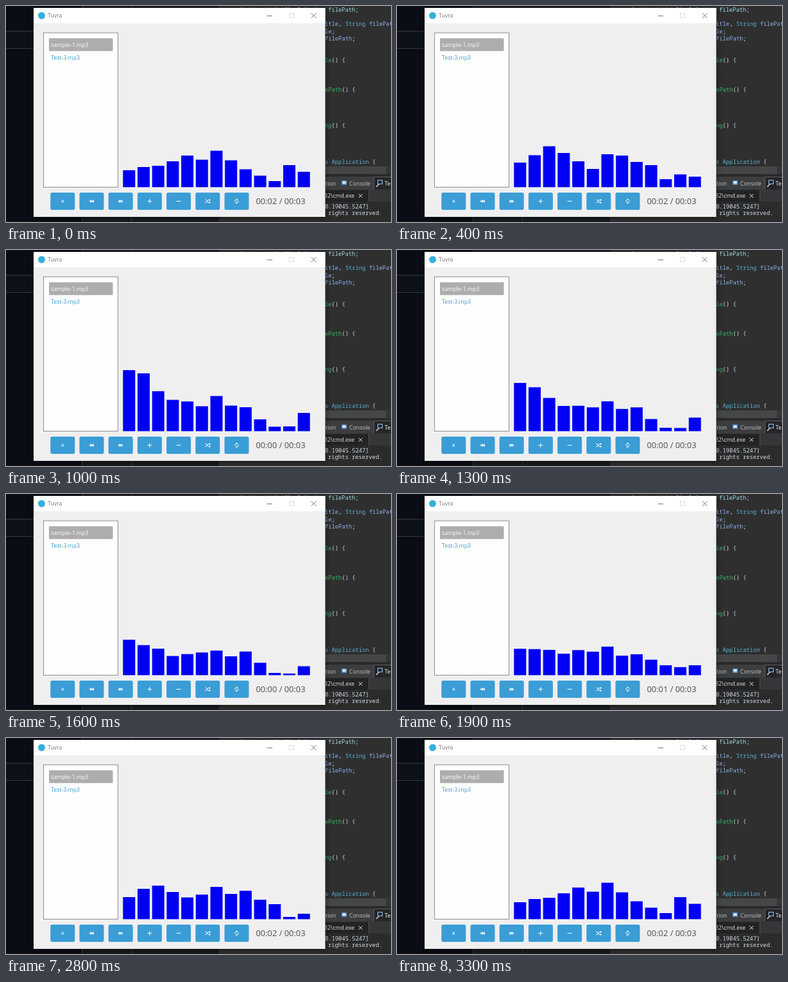
An HTML page for the animation above (3400 ms loop, 600x338 px).

```html
<!DOCTYPE html>
<html lang="en">
<head>
<meta charset="utf-8">
<title>Music player</title>
<style>
html, body { margin: 0; width: 100%; height: 100%; overflow: hidden; background: #0a0d15; }
svg { display: block; width: 600px; height: 338px; }
text { white-space: pre; font-family: "Open Sans", "Noto Sans", sans-serif; font-size: 8.75px; }
.code text { font-family: "Noto Sans Mono", "DejaVu Sans Mono", monospace; font-size: 8.8px; fill: #d0dbe4; }
.type { fill: #56b2d6; }
.field { fill: #a5dbe6; }
.param { fill: #8db4ec; }
.method { fill: #35b968; }
.tabs text { fill: #c3c5c7; }
.window { filter: drop-shadow(0 1px 4px rgba(0, 0, 0, .55)); }
.line { fill: none; stroke: #fff; stroke-width: 1; }
</style>
</head>
<body>
<svg viewBox="0 0 600 338">
  <rect width="600" height="338" fill="#0a0d15"/>
  <rect y="39" width="43" height="27" fill="#0d111a"/>
  <path d="M0 39.5H43M0 66.5H43" stroke="#343943"/>
  <rect x="118" width="217" height="338" fill="#191b1f"/>
  <path d="M118.5 0V338M195.5 0V338" stroke="#373a3e"/>
  <rect y="337" width="118" height="1" fill="#241a13"/>
  <rect x="332" width="268" height="338" fill="#2f2f2f"/>

  <g class="code">
    <text x="354" y="9">private static final <tspan class="type">String</tspan></text>
    <text x="502" y="9"><tspan class="field">filePath</tspan>;</text>
    <text x="497" y="31"><tspan class="param">itle</tspan>, <tspan class="type">String</tspan> <tspan class="param">filePath</tspan>) {</text>
    <text x="497" y="43"><tspan class="param">le</tspan>;</text>
    <text x="497" y="54"><tspan class="param">filePath</tspan>;</text>
    <text x="497" y="88"><tspan class="method">le</tspan>() {</text>
    <text x="497" y="134"><tspan class="method">ePath</tspan>() {</text>
    <text x="497" y="190"><tspan class="method">ng</tspan>() {</text>
    <text x="497" y="247"><tspan class="type">s Application</tspan> {</text>
  </g>

  <g class="tabs">
    <rect x="490" y="251" width="110" height="12" fill="#454647"/>
    <rect x="592" y="251" width="8" height="12" fill="#353637"/>
    <rect x="490" y="263" width="110" height="4" fill="#292a2b"/>
    <rect x="490" y="267" width="110" height="20" fill="#3b3d3f"/>
    <rect x="573" y="267" width="27" height="20" fill="#252627"/>
    <path d="M573.5 287V267.5H600" fill="none" stroke="#5b5d5f"/>
    <text x="494" y="280.5">ction</text>
    <rect x="523" y="273" width="8" height="7" rx="1" fill="#5b8fc7"/>
    <rect x="524.5" y="274.5" width="5" height="3.5" fill="#e3eef8"/>
    <text x="535" y="280.5">Console</text>
    <rect x="579.5" y="272.5" width="7" height="6" fill="#1b2c48" stroke="#a9c0dc"/>
    <path d="M577 283l4-4" stroke="#d8dadb" stroke-width="1.5"/>
    <text x="590" y="280.5" style="fill:#eee">Terminal</text>
    <rect x="490" y="287" width="110" height="19" fill="#343638"/>
    <rect x="490" y="288" width="75" height="18" fill="#222324"/>
    <path d="M565.5 288V306" stroke="#505254"/>
    <text x="496" y="300" style="fill:#e2e2e2">32\cmd.exe</text>
    <path d="M549.5 294l6 6m0-6l-6 6" stroke="#e5e5e5"/>
    <rect x="490" y="306" width="110" height="32" fill="#2b2b2b"/>
  </g>
  <g class="code">
    <text x="497" y="316.5">0.19045.5247]</text>
    <text x="502" y="327">rights reserved.</text>
  </g>

  <g class="window">
    <rect x="43" y="3" width="454.5" height="327" fill="#efeff0"/>
    <rect x="43" y="3" width="454.5" height="24" fill="#fff"/>
  </g>
  <circle cx="55.5" cy="15" r="5.5" fill="#35b0dc"/>
  <text x="65" y="18" fill="#777">Tuvra</text>
  <path d="M406.5 15.5H415" stroke="#777"/>
  <rect x="441.5" y="11.5" width="7" height="7" fill="none" stroke="#dcdcdc"/>
  <path d="M475.5 11l8 8m0-8l-8 8" stroke="#777"/>

  <rect x="58.5" y="42" width="116" height="241.5" fill="#fefefe" stroke="#8e8e90"/>
  <rect x="67" y="50.5" width="99.5" height="20" fill="#adadad"/>
  <text x="70" y="64" fill="#fff">sample-1.mp3</text>
  <text x="70" y="84" fill="#3c9bce">Test-3.mp3</text>

  <g id="bars" fill="#0000f2"></g>
  <g id="buttons"></g>
  <text id="clock" x="389.5" y="310" fill="#4c4c50" style="font-size:12.85px"></text>
</svg>
<script>
const LOOP = 3400, STEP = 100, BASE = 283.5;

// Each pose: time, then the top edge of every bar.
const poses = [
  [0, 257, 252, 250, 243, 234, 240.5, 226.5, 241.5, 255.5, 265.5, 274, 249, 259.5],
  [400, 245, 233.5, 219.5, 230, 243, 255, 232, 234, 244, 249, 271, 263.5, 267],
  [1000, 188, 193, 221, 234.5, 237, 244.5, 228.5, 243.5, 246, 265, 276.5, 276, 255],
  [1600, 228, 236.5, 242, 253.5, 250.5, 248, 245, 254, 246.5, 264, 280, 281, 269.5],
  [2300, 261, 251, 246.5, 245, 236, 245, 230.5, 251.5, 256.5, 253, 252, 257.5, 266],
  [2800, 249, 236, 231, 241, 249.5, 245, 233, 244, 239, 253, 260, 280, 275]
];
poses.push([3300, ...poses[0].slice(1)]);

const icons = [
  '<path d="M-1 -2V2M1 -2V2" class="line"/>',
  '<path d="M-3 -2V2M0 -2V2L-3 0ZM3 -2V2L0 0Z" fill="#fff" stroke="#fff" stroke-width=".5"/>',
  '<path d="M3 -2V2M0 -2V2L3 0ZM-3 -2V2L0 0Z" fill="#fff" stroke="#fff" stroke-width=".5"/>',
  '<path d="M-3.5 0H3.5M0 -3.5V3.5" class="line" stroke-width="1.5"/>',
  '<path d="M-3.5 0H3.5" class="line" stroke-width="1.5"/>',
  '<path d="M-4 -2H-2L1 2H4M-4 2H-2L1 -2H4M2.5 -3.5L4 -2L2.5 -.5M2.5 .5L4 2L2.5 3.5" class="line"/>',
  '<path d="M-2.5 1A2.7 2.7 0 0 1 1 -2.5M2.5 -1A2.7 2.7 0 0 1 -1 2.5M0 -4L1.5 -2.5L0 -1M0 4L-1.5 2.5L0 1" class="line"/>'
];

const byId = id => document.getElementById(id);
byId("buttons").innerHTML = icons.map((icon, i) =>
  `<g transform="translate(${88.3 + i * 45.2} 305.5)">
    <rect x="-19" y="-13.5" width="38" height="27" rx="2.5" fill="#3a9dd5"/>${icon}</g>`).join("");

byId("bars").innerHTML = poses[0].slice(1).map((_, i) =>
  `<rect x="${182.3 + i * 22.7}" width="19"/>`).join("");
const bars = [...byId("bars").children];
const clock = byId("clock");

function draw(time) {
  const t = Math.floor((time % LOOP) / STEP) * STEP;
  const next = Math.max(1, poses.findIndex(pose => pose[0] >= t));
  const from = poses[next - 1], to = poses[next];
  const k = (t - from[0]) / (to[0] - from[0]);
  bars.forEach((bar, i) => {
    const top = from[i + 1] + (to[i + 1] - from[i + 1]) * k;
    bar.setAttribute("y", top);
    bar.setAttribute("height", BASE - top);
  });
  const second = t < 700 ? 2 : Math.min(2, Math.floor((t - 700) / 1000));
  clock.textContent = `00:0${second} / 00:03`;
}

const start = performance.now();
function tick() {
  draw(performance.now() - start);
  requestAnimationFrame(tick);
}
tick();
</script>
</body>
</html>
```
